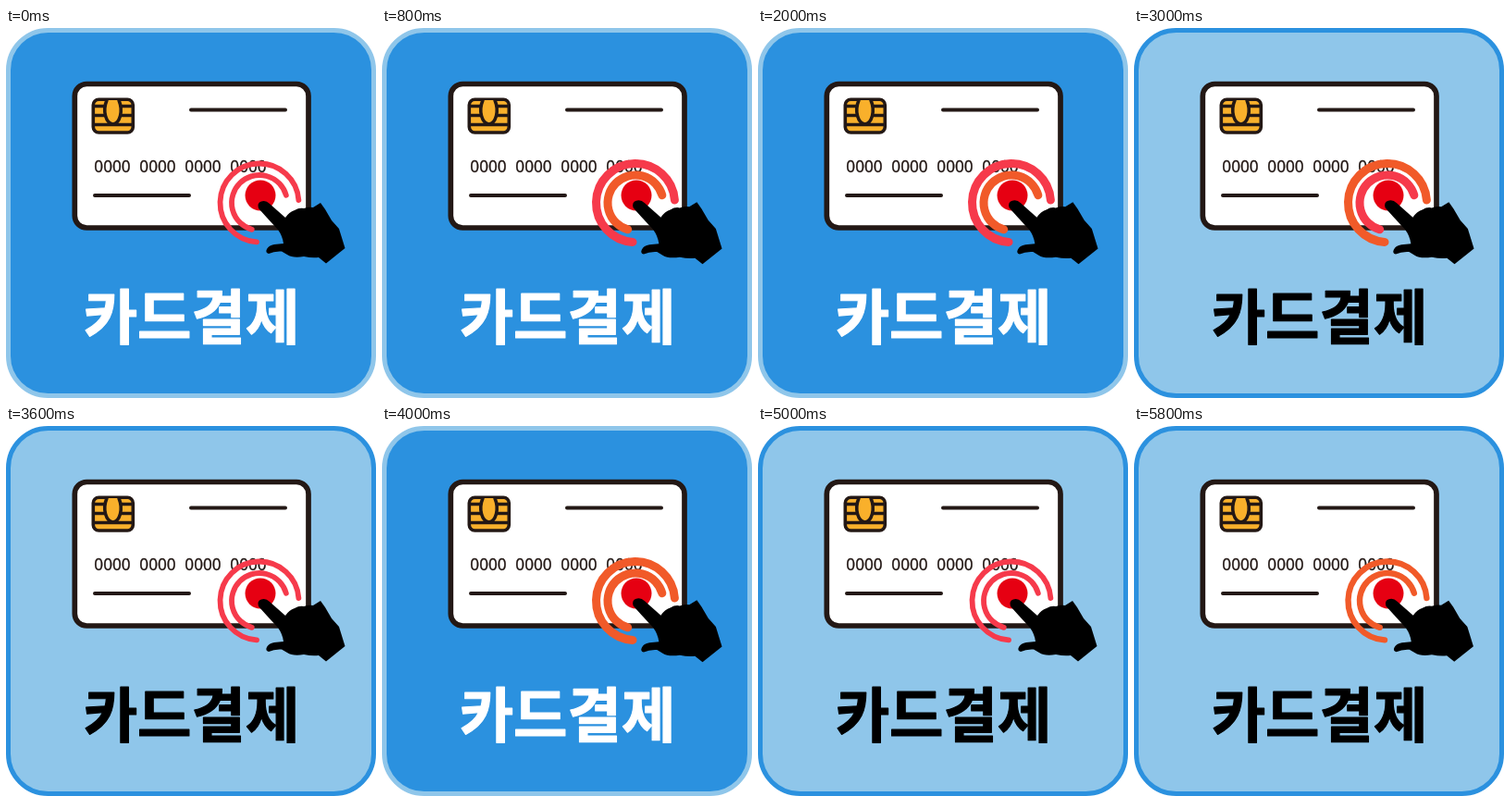
These frames come from a looping animation (400x400 px, 6 s). An HTML page:

```html
<!DOCTYPE html>
<html lang="ko">
<head>
<meta charset="utf-8">
<title>카드결제</title>
<style>
  html, body { margin: 0; width: 100%; height: 100%; overflow: hidden; background: #fff; }
  svg { display: block; width: 100vw; height: 100vh; }
  .ink { stroke: #231815; stroke-linecap: round; fill: none; }
  .ring { fill: none; stroke-linecap: round; }
  #digits { font: 500 17.2px "Noto Sans", "Open Sans", sans-serif; fill: #231815; stroke: #231815; stroke-width: .3; }
  #title {
    font: 700 63.5px "Noto Sans CJK KR", "Noto Sans CJK", "Noto Sans CJK JP", sans-serif;
    text-anchor: middle; stroke-width: 1.2; stroke-linejoin: round;
  }
</style>
</head>
<body>
<svg viewBox="0 0 400 400">
  <rect id="panel" x="2.5" y="2.5" width="395" height="395" rx="43" stroke-width="5"/>

  <rect class="ink" x="74.3" y="60.5" width="252.700" height="155.500" rx="13" stroke-width="5.700" style="fill:#fff"/>
  <path class="ink" stroke-width="4" d="M200 88.400H302M96 181H198"/>

  <g class="ink" stroke-width="3.6">
    <rect x="94.3" y="77.3" width="43" height="35.700" rx="6" style="fill:#f9b02b"/>
    <path d="M95 84.500H137M95 94.500H137M95 104.500H137"/>
    <path style="fill:#f9b02b" d="M109 78C104 90 108 103 115.700 104C123 103 127 90 122 78"/>
  </g>

  <g id="digits"></g>

  <circle cx="275" cy="181" r="16.5" fill="#e60012"/>

  <path id="outer" class="ring"/>
  <path id="inner" class="ring"/>

  <path id="hand" d="M273 195Q271 189 276 187.500Q281 186 285 190L302 205
    Q306 199 312 197Q317 194 322 195Q328 193 332 194L340 189L345 196L352 208
    L360 217L366.500 238L346 254.500L338 248Q331 249 322 247
    Q310 249 304 245L298 241.500Q290 241 284 244Q280 243 282 239
    Q284 235 290 234L300 233Q299 225 294 218L282 205Z"/>

  <text id="title" x="200.500" y="335.500">카드결제</text>
</svg>
<script>
  const $ = id => document.getElementById(id);
  const STEP = 200, LOOP = 6000;
  const BLUE = "#2b91df", SKY = "#8fc6ea";
  const RED = "#f63a4b", ORANGE = "#f15a29";
  const CENTER = { x: 274, y: 189 };

  // outer colour, inner colour, outer width, inner width, hand scale
  const REST = [RED, RED, 5.8, 5.8, 1];
  const TAPS = [
    REST,
    REST,
    [ORANGE, ORANGE, 9, 9, 1.025],
    [ORANGE, RED, 9, 9, 1.025],
    [RED, ORANGE, 9, 9, 1.025],
    [ORANGE, ORANGE, 6.4, 6.4, 1.01]
  ];

  for (let i = 0; i < 4; i++) {
    const group = document.createElementNS("http://www.w3.org/2000/svg", "text");
    group.setAttribute("x", 95.3 + i * 49);
    group.setAttribute("y", 155.5);
    group.textContent = "0000";
    $("digits").append(group);
  }

  function set(id, attrs) {
    for (const name in attrs) $(id).setAttribute(name, attrs[name]);
  }

  function arc(r, from, to) {
    const point = deg => {
      const a = deg * Math.PI / 180;
      return `${CENTER.x + r * Math.cos(a)} ${CENTER.y + r * Math.sin(a)}`;
    };
    return `M${point(from)}A${r} ${r} 0 1 1 ${point(to)}`;
  }

  set("outer", { d: arc(42.5, 94, 356) });
  set("inner", { d: arc(30, 106, 344) });

  let shown = -1;

  function draw(step) {
    const dark = Math.floor(step / 5) % 2 === 0;
    const ink = dark ? "#fff" : "#000";
    const [outer, inner, outerWidth, innerWidth, scale] = TAPS[step % TAPS.length];
    set("panel", { fill: dark ? BLUE : SKY, stroke: dark ? SKY : BLUE });
    set("title", { fill: ink, stroke: ink });
    set("outer", { stroke: outer, "stroke-width": outerWidth });
    set("inner", { stroke: inner, "stroke-width": innerWidth });
    set("hand", { transform: `translate(325 220) scale(${scale}) translate(-325 -220)` });
  }

  function tick() {
    const step = Math.floor(performance.now() % LOOP / STEP);
    if (step !== shown) draw(shown = step);
    requestAnimationFrame(tick);
  }
  tick();
</script>
</body>
</html>
```
